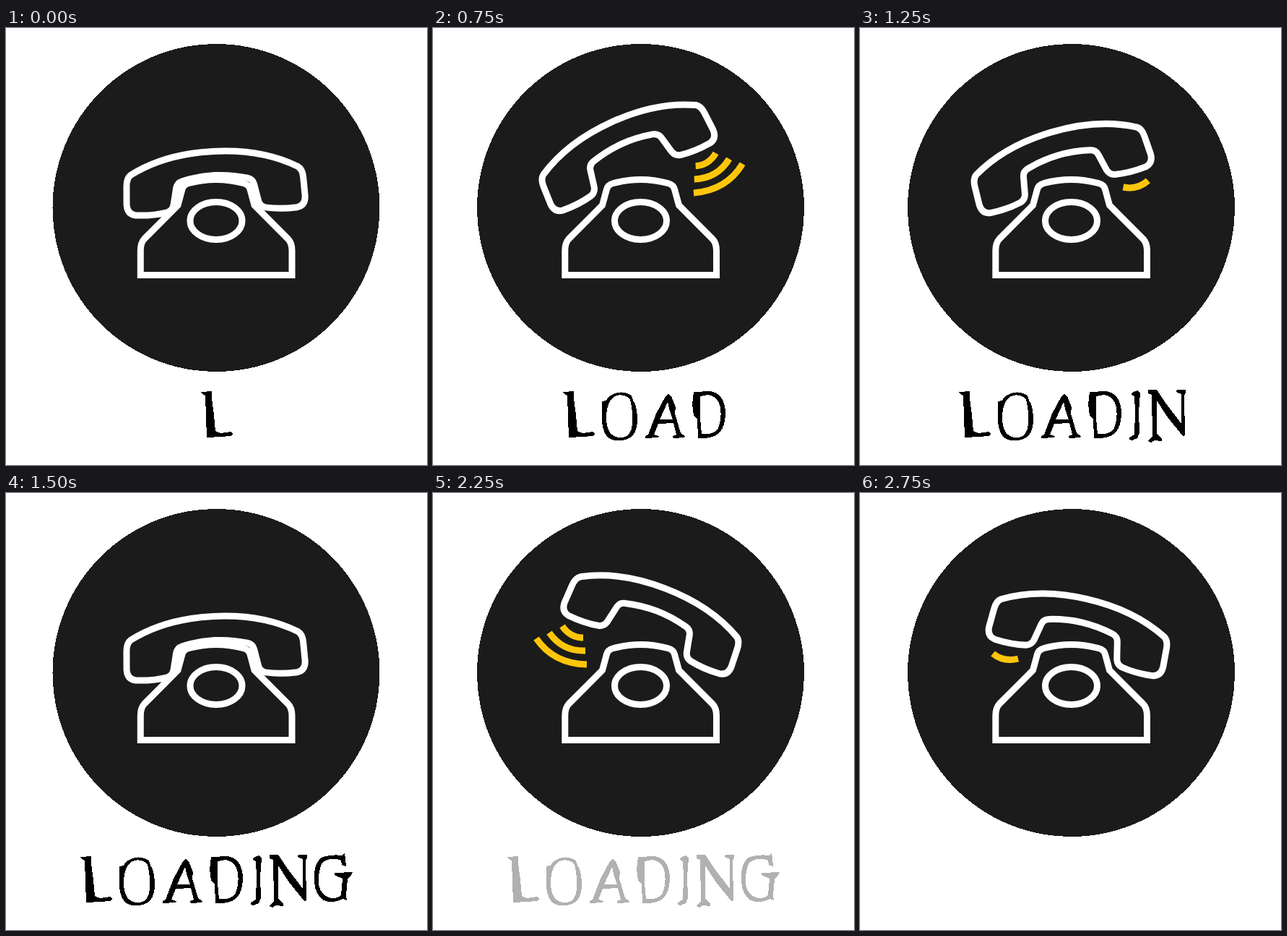
An HTML page that plays this animation: 583x604 px, repeating every 3000 ms.

```html
<!DOCTYPE html>
<html lang="en">
<head>
<meta charset="utf-8">
<title>Loading</title>
<style>
  html, body { margin: 0; width: 100%; height: 100%; overflow: hidden; background: #fff; }
  svg { display: block; width: 100%; height: 100%; }
  #phone { fill: none; stroke: #fff; stroke-width: 9; }
  #disc { fill: #1b1b1b; stroke: none; shape-rendering: crispEdges; }
  #waves { stroke: #fdc60b; }
  #word { fill: #000; fill-rule: evenodd; shape-rendering: crispEdges; }
</style>
</head>
<body>
<svg viewBox="0 0 583 604" role="img" aria-label="LOADING">
  <g id="phone">
    <circle id="disc" cx="292.5" cy="248.5" r="226.5"/>
    <path d="M187.8 341.5V308Q187.8 297 193 291.5L239.5 245 245.5 223Q247 216.5 255 214.5Q274 209.5 292.5 209.5
      Q311 209.5 330 214.5Q338 216.5 339.5 223L345.5 245 392 291.5Q397.5 297 397.5 308V341.5Z"/>
    <ellipse cx="292.5" cy="266.5" rx="36" ry="26"/>
    <path id="handset" d="M-122.5 2Q-122 -9 -116 -13C-82 -32 -40 -40 0 -40S82 -32 116 -13Q122 -9 122.5 2
      L123.7 28Q123.5 41 112 43Q88 45 68 41Q61 39 59 32L54 8Q52.5 1 45 -1Q22 -6.8 0 -6.8
      Q-22 -6.8 -45 -1Q-52.5 1 -54 8L-59 32Q-61 39 -68 41Q-88 45 -112 43Q-123.5 41 -123.7 28Z"/>
    <path id="waves"/>
  </g>
  <g id="word">
    <path d="M103 503L118 502 118 512 121 535 123 557 130 560 144 558 147 561 144 564 130 565 111 566 109 508 104 505Z"/>
    <path d="M166 510Q182 498 198 508L200 515Q206 522 206 545Q205 560 196 566Q180 575 165 566Q157 557 157 540V516L163 515Z
      M172 511Q163 520 163 538Q163 556 171 562Q181 570 193 563Q200 555 199 540Q199 520 195 512Q183 503 172 511Z"/>
    <path d="M245 509L249 506 253 509 259 524 258 533 266 560 272 564 271 566 256 567 255 564 260 562 256 546 235 547
      229 562 236 564 235 566 217 567 217 564 221 562 232 533Z M248 517L237 541 255 541 251 530Z"/>
    <path d="M284 503L307 502Q326 505 328 530Q328 552 318 561Q308 568 290 567L289 540 284 536 282 520Z
      M293 509L293 540 295 561Q312 563 318 553Q323 540 321 525Q318 508 303 507Z"/>
    <path d="M345 503L350 501 354 505 352 530 353 560 350 567 343 570 339 569 339 566 346 562 347 530 346 509 341 506Z"/>
    <path d="M365 500L377 500 389 518 411 547 411 506 404 503 405 500 417 500 417 504 415 508 416 563 413 564 392 538
      377 515 377 560 384 568 384 571 374 570 369 573 365 571 371 564 370 507 365 505Z"/>
    <path d="M437 504Q450 499 465 501L469 497 471 516 466 515 463 507Q447 503 438 511Q432 522 433 542Q437 556 447 559
      Q456 562 464 556L466 533 455 528 455 525 480 524 478 528 473 533 471 556 472 563 466 561Q453 568 440 563
      Q428 555 427 538Q425 513 437 504Z"/>
  </g>
</svg>
<script>
  const STEP = 250, STEPS = 12;
  const [phone, handset, waves, word] =
    ['phone', 'handset', 'waves', 'word'].map(id => document.getElementById(id));
  const letters = [...word.children];

  // Poses by lift height: 0 rests on the cradle, 3 is the highest.
  const lifts = [
    { tilt: 0, reach: 0, y: 210.4, shake: -1.5, waves: '' },
    { tilt: 14.75, reach: 14.8, y: 185.5, shake: 0, waves: 'M184 222Q199 234 219 229' },
    { tilt: 17.75, reach: 15.1, y: 182.4, shake: 0, waves: 'M174 215Q188 228 207 225.5M158 228Q182 249 214 242' },
    { tilt: 22.75, reach: 22, y: 169.5, shake: -5,
      waves: 'M184 184Q195 200 213 200M166 193Q184 219 216 218M148 201Q172 236 218 237' }
  ];
  const liftOrder = [0, 1, 2, 3, 2, 1];
  const wordShift = [167, 136, 105, 77, 65, 34, 0];
  const fade = [0.7, 0.5, 0.3, 0.1, 0];

  function drawPhone(step) {
    const lift = lifts[liftOrder[step % 6]];
    const side = step < 6 ? -1 : 1;
    const resting = lift === lifts[0];
    const angle = resting ? -2.9 : -1.75 + side * lift.tilt;
    const x = 290.7 + side * lift.reach;
    const y = lift.y - (!resting && side < 0 ? 3 : 0);
    phone.setAttribute('transform', `translate(${lift.shake} 0)`);
    handset.setAttribute('transform', `translate(${x} ${y}) rotate(${angle})`);
    waves.setAttribute('d', lift.waves);
    waves.setAttribute('transform', side < 0 ? 'rotate(-3.5 398 220) matrix(-1 0 0 1 583.5 -11)' : '');
  }

  function drawWord(step) {
    const count = Math.min(step + 1, letters.length);
    letters.forEach((letter, i) => letter.setAttribute('display', i < count ? 'inline' : 'none'));
    word.setAttribute('transform', `translate(${wordShift[count - 1]} 0)`);
    word.setAttribute('opacity', step < 7 ? 1 : fade[step - 7]);
  }

  const start = performance.now();
  function frame() {
    const step = Math.floor((performance.now() - start) / STEP) % STEPS;
    drawPhone(step);
    drawWord(step);
    requestAnimationFrame(frame);
  }
  frame();
</script>
</body>
</html>
```
